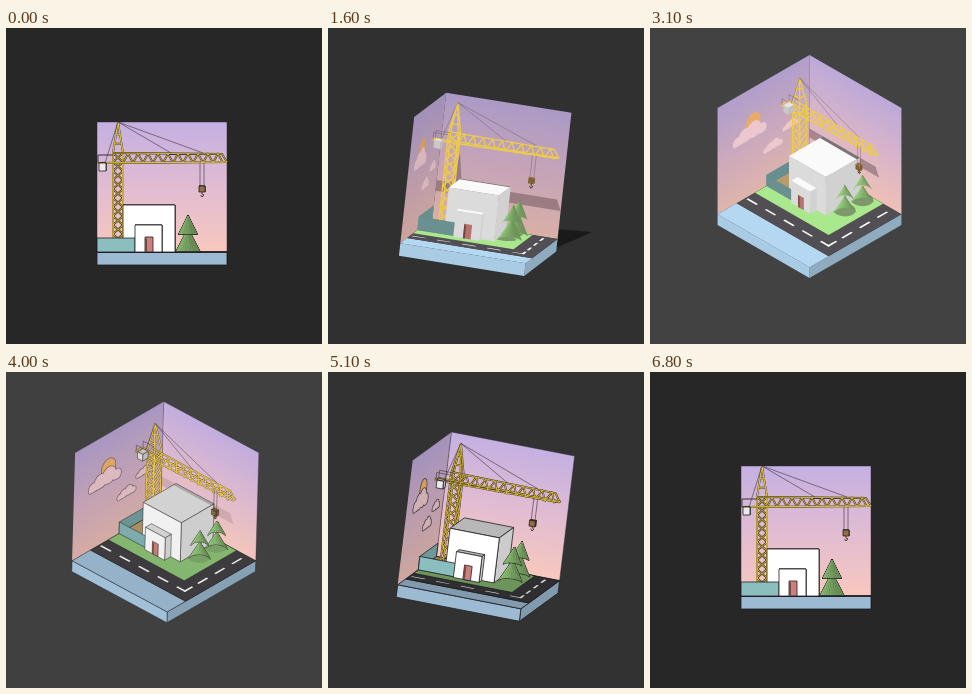
An HTML page with a canvas for the animation above (6900 ms loop, 316 by 316 pixels).

```html
<!DOCTYPE html>
<html lang="en">
<head>
<meta charset="utf-8">
<title>Crane diorama</title>
<style>
html, body { margin: 0; height: 100%; overflow: hidden; background: #282828; }
canvas { display: block; width: 100vw; height: 100vh; }
</style>
</head>
<body>
<canvas width="316" height="316"></canvas>
<script>
const ctx = document.querySelector('canvas').getContext('2d');
const LOOP = 6900, S = 130;
const YELLOW = [236, 204, 72], GREEN = [152, 207, 126], WHITE = [255, 255, 255];
const TEAL = [139, 190, 190], WATER = [170, 203, 228], ROAD = [74, 72, 76];

// ink: outline look, dim: wall brightness, noon: how high the sun stands
let rot, cx, cy, ink, dim, noon, sunX, drop;

const clamp = v => Math.max(0, Math.min(1, v));
const ramp = (t, a, b) => clamp((t - a) / (b - a));
const mix = (a, b, k) => a + (b - a) * k;
const rgb = (c, level = 1) => `rgb(${c.map(v => Math.min(255, v * level))})`;
// brightness in the shaded look and in the ink look
const lit = (c, shaded, inked) => rgb(c, mix(shaded, inked, ink));

const cross = (a, b) => [a[1] * b[2] - a[2] * b[1], a[2] * b[0] - a[0] * b[2], a[0] * b[1] - a[1] * b[0]];
const unit = v => v.map(c => c / Math.hypot(...v));

// eye and up vectors glide straight from the front view to the isometric one
function setView(p) {
  const third = Math.sqrt(1 / 3), sixth = Math.sqrt(1 / 6);
  const eye = unit([third * p, third * p, mix(1, third, p)]);
  const right = unit(cross([-sixth * p, mix(1, 2 * sixth, p), -sixth * p], eye));
  rot = [right, cross(eye, right)];
  cx = 156 + 3.5 * p;
  cy = 165.5 - 27 * p;
}

function project([x, y, z]) {
  const v = [x - 65, y - 58.5, z - 65];
  const dot = r => r[0] * v[0] + r[1] * v[1] + r[2] * v[2];
  return [cx + dot(rot[0]), cy - dot(rot[1])];
}

function trace(pts, close = true) {
  pts.forEach((p, i) => ctx[i ? 'lineTo' : 'moveTo'](...project(p)));
  if (close) ctx.closePath();
}

function stroke(color, width) {
  ctx.strokeStyle = color;
  ctx.lineWidth = width;
  ctx.stroke();
}

const inkColor = () => `rgba(32,30,34,${ink})`;

function poly(pts, color, outline = .8) {
  ctx.beginPath();
  trace(pts);
  ctx.fillStyle = color;
  ctx.fill();
  if (ink && outline) stroke(inkColor(), outline);
}

// several pieces sharing one outer outline
function merged(parts) {
  if (ink) for (const [pts] of parts) {
    ctx.beginPath();
    trace(pts);
    stroke(inkColor(), 1.5);
  }
  for (const [pts, color] of parts) {
    poly(pts, color, 0);
    stroke(color, .4);
  }
}

const floor = (x0, z0, x1, z1, y = 0) => [[x0, y, z0], [x1, y, z0], [x1, y, z1], [x0, y, z1]];
const front = (x0, y0, x1, y1, z) => [[x0, y0, z], [x1, y0, z], [x1, y1, z], [x0, y1, z]];
const side = (z0, y0, z1, y1, x) => [[x, y0, z0], [x, y0, z1], [x, y1, z1], [x, y1, z0]];
const shadow = (pts, alpha) => poly(pts, `rgba(70,58,66,${alpha * (1 - ink)})`, 0);

function box(x0, y0, z0, x1, y1, z1, color) {
  poly(floor(x0, z0, x1, z1, y1), lit(color, .98, .72));
  poly(side(z0, y0, z1, y1, x1), lit(color, .82, .8));
  poly(front(x0, y0, x1, y1, z1), lit(color, .86, 1));
}

function ring(n, f) {
  return Array.from({ length: n }, (_, i) => f(Math.cos(i * 2 * Math.PI / n), Math.sin(i * 2 * Math.PI / n)));
}

function wall(dir, shaded, inked) {
  const o = project([0, S, 0]), u = project([dir[0], S, dir[1]]), v = project([0, S - 1, 0]);
  const sky = ctx.createLinearGradient(0, 0, 0, S);
  [[196, 176, 226], [225, 188, 210], [248, 200, 190]].forEach((c, i) =>
    sky.addColorStop(i / 2, lit(c, shaded * dim, inked)));
  ctx.save();
  ctx.setTransform(u[0] - o[0], u[1] - o[1], v[0] - o[0], v[1] - o[1], ...o);
  ctx.fillStyle = sky;
  ctx.fillRect(0, 0, S, S);
  ctx.restore();
}

function cloud(z, y, r) {
  const c = lit([236, 200, 206], dim, .88);
  merged([[-1.7, .5, .6], [-.6, .9, .95], [.6, .7, .85], [1.6, .4, .6]].map(([dz, dy, k]) =>
    [ring(18, (a, b) => [1, y + dy * r + Math.max(-dy * r, b * r * k), z + dz * r + a * r * k]), c]));
}

function leftWall() {
  wall([0, 1], .9, .83);
  merged([[ring(24, (a, b) => [.5, 89 + b * 10, 80 + a * 10]), lit([232, 172, 104], dim, .92)]]);
  cloud(86, 70, 10.5);
  cloud(53, 42, 6);
  cloud(28, 56, 5);
  shadow(side(27, 36, 39, 84, 0), .35 * noon);
}

function backWall() {
  wall([1, 0], .96, 1);
  if (ink < 1) {
    const cast = pts => trace(pts.map(([x, y]) => [x + sunX * 35, y - drop, 0]));
    ctx.save();
    ctx.beginPath();
    trace(front(0, 0, S, S, 0));
    ctx.clip();
    ctx.beginPath();
    cast([[0, 88], [130, 88], [125, 99], [0, 99]]);
    cast([[16, 59], [26, 59], [26, 99], [21, 130], [16, 99]]);
    ctx.fillStyle = `rgba(85,62,70,${.42 * (1 - ink)})`;
    ctx.fill();
    ctx.restore();
  }
  ctx.beginPath();
  trace([[0, S, S], [0, S, 0], [S, S, 0], [S, 0, 0]], false);
  trace([[0, S, 0], [0, 0, 0]], false);
  stroke(`rgba(50,40,55,${.6 * ink})`, .8);
}

// shadow of the whole block on the surrounding floor
function outerShadow(t, p) {
  if (p <= 0 || t > 3400) return;
  const len = 95 - .09 * (t - 900);
  const pts = len > 0
    ? [[S, 10, 0], [S + len, 10, -12], [S, -4, 60]]
    : [[0, 0, S], [Math.max(-9, len), 14, S - 8], [0, 22, 80]];
  poly(pts, `rgba(18,18,18,${.7 * (1 - ink) * (1 - ramp(t, 2400, 3000))})`, 0);
}

function ground() {
  poly(side(0, -13, S, 0, S), lit(WATER, .84, .76));
  poly(front(0, -13, S, 0, S), lit(WATER, 1, .92));
  poly(floor(0, 103, S, S), lit(WATER, 1.06, .76));
  poly(floor(0, 0, S, 103), lit(ROAD, 1.1, .64));
  poly(floor(0, 0, 104, 77), lit(GREEN, 1.12, .72));
  poly(floor(0, 0, 38, 60), lit([186, 156, 108], 1, .85));
  const dash = lit(WHITE, 1, .85);
  for (let i = 0; i < 4; i++) poly(floor(2 + i * 26, 89, 16 + i * 26, 91.2), dash, 0);
  for (let i = 0; i < 3; i++) poly(floor(116, 7 + i * 25, 118.2, 21 + i * 25), dash, 0);
  poly(floor(106, 89, 118.2, 91.2), dash, 0);
  poly(floor(116, 79, 118.2, 91.2), dash, 0);
  for (const z of [16, 41])
    shadow(ring(20, (a, b) => [84 + a * 12, 0, z - 6 + b * 11]), .45);
}

function bars(list) {
  ctx.beginPath();
  list.forEach(l => trace(l, false));
  if (ink) stroke(`rgba(52,42,22,${ink})`, 1.8);
  stroke(lit(YELLOW, 1, .95), mix(1.3, .9, ink));
}

function mast() {
  const list = [], step = 9;
  for (const x of [16, 26]) for (const z of [30, 40])
    list.push([[x, 0, z], [x, 99, z], [21, S, 35]]);
  for (let y = 0; y < 99; y += step) {
    const top = y + step;
    list.push([[16, y, 40], [26, top, 40]], [[26, y, 40], [16, top, 40]],
      [[26, y, 40], [26, top, 30]]);
  }
  for (const f of [.3, .6]) {
    const w = 5 * (1 - f), y = 99 + 31 * f;
    list.push([[21 - w, y, 35 + w], [21 + w, y, 35 + w], [21 + w, y, 35 - w]]);
  }
  bars(list);
}

function jib() {
  const list = [
    [[0, 89, 40], [S, 90, 37], [S, 90, 33], [0, 89, 30]],
    [[16, 99, 35], [125, 98, 35], [S, 90, 35]],
    [[0, 89, 30], [0, 89, 40]]
  ];
  for (let x = 26; x < 120; x += 10)
    list.push([[x, 89, 40], [x + 5, 98.5, 35], [x + 10, 89, 40]]);
  bars(list);
  ctx.beginPath();
  for (const z of [30, 40]) trace([[16, 97, z], [1, 97, z], [1, 89, z]], false);
  for (const x of [8, 74, 106]) trace([[21, S, 35], [x, x < 20 ? 89 : 99, 35]], false);
  for (const x of [103, 107]) trace([[x, 89, 35], [x, 66, 35]], false);
  stroke(`rgba(60,50,60,${mix(.4, .85, ink)})`, .7);
  box(2, 81, 31, 9, 89, 39, [236, 234, 232]);
  box(102, 60, 33, 108, 66, 37, [150, 112, 60]);
  ctx.beginPath();
  trace([[105, 60, 35], [105, 58, 35], [107, 57, 35], [105, 55, 35], [103.5, 57, 35]], false);
  stroke('#4a3a2c', 1);
}

function cone(x, y, z, r, top) {
  const n = 24, base = ring(n, (a, b) => [x + a * r, y, z + b * r]), apex = [x, top, z];
  const parts = [];
  base.forEach((p, i) => {
    const q = base[(i + 1) % n], [a, b, c] = [p, q, apex].map(project);
    if ((b[0] - a[0]) * (c[1] - a[1]) - (b[1] - a[1]) * (c[0] - a[0]) >= 0) return;
    const glow = .88 + .17 * Math.cos((i + .5) * 2 * Math.PI / n - 2.3);
    parts.push([[p, q, apex], lit(GREEN, glow, glow)]);
  });
  merged(parts);
}

function tree(z) {
  cone(91, 1, z, 11.5, 23);
  cone(91, 18, z, 9, 36);
}

function fence(pts, shaded, inked) {
  poly(pts, lit(TEAL, shaded, inked));
}

function building() {
  box(26, 0, 7, 78, 47, 55, WHITE);
  // the jib's shadow crosses the roof while the sun is high
  const z = 35 - 47 * 35 / drop;
  if (z > 7) shadow(floor(26, Math.max(7, z - 4), 78, z + 4, 47), .7);
}

function draw(t) {
  const p = ramp(t, 905, 2945) - ramp(t, 3880, 5925);
  ink = 1 - ramp(t, 905, 1105) + ramp(t, 3880, 4080);
  dim = 1 - .2 * ramp(t, 1200, 2100) * (1 - ramp(t, 2300, 2900));
  noon = ramp(t, 1600, 2100) * (1 - ramp(t, 2400, 3000));
  drop = 59 + 40 * noon;
  sunX = -.9 * ramp(t, 1600, 3100);
  setView(p);
  ctx.fillStyle = rgb([1, 1, 1], Math.round(mix(39, 66, p)));
  ctx.fillRect(0, 0, 316, 316);
  outerShadow(t, p);
  leftWall();
  backWall();
  ground();
  fence(side(0, 0, 61, 14, 0), .75, .8);
  mast();
  building();
  fence(front(0, 0, 38, 14, 61), .76, 1);
  box(38, 0, 55, 65, 27, 64, WHITE);
  poly(front(48, 0, 56, 15, 64), lit([202, 128, 124], .9, 1));
  poly([[48, 0, 64], [50, 0, 64], [50, 13, 64], [48, 15, 64]], lit([120, 70, 66], 1, 1), 0);
  tree(16);
  tree(41);
  jib();
}

ctx.lineJoin = 'round';
function frame() {
  draw(performance.now() % LOOP);
  requestAnimationFrame(frame);
}
frame();
</script>
</body>
</html>
```
